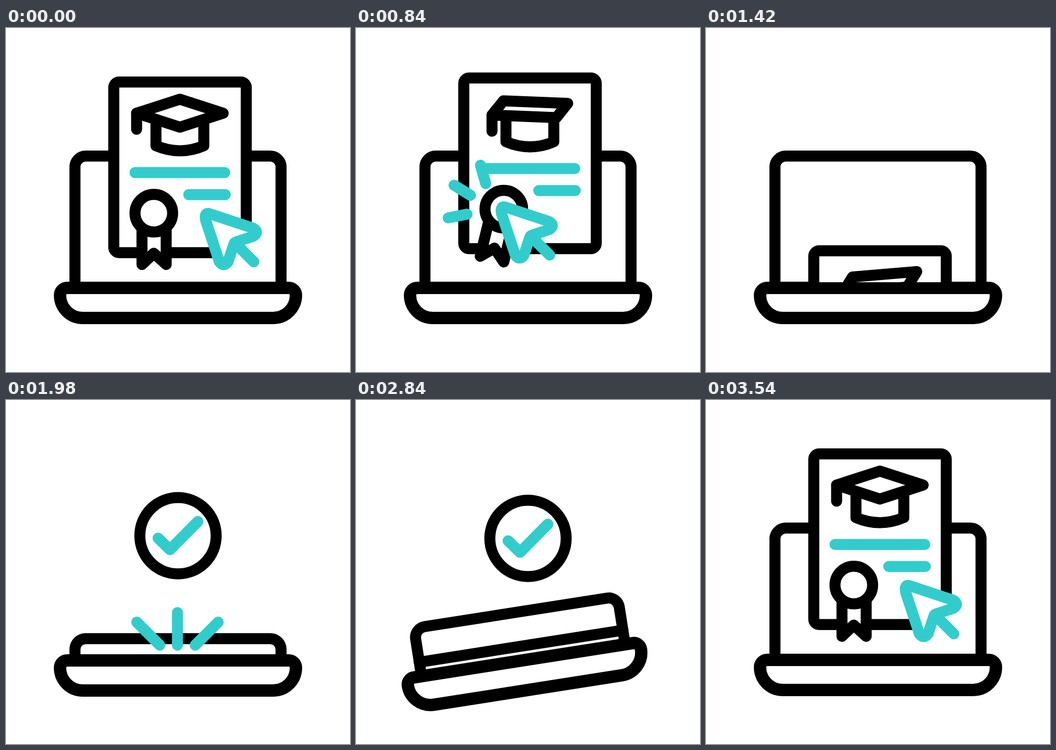
An HTML page that plays this animation: 640x640 px, repeating every 3.6 s.

```html
<!DOCTYPE html>
<html lang="en">
<head>
<meta charset="utf-8">
<title>Online certificate</title>
<style>
  html, body { margin: 0; width: 100%; height: 100%; overflow: hidden; background: #fff; }
  svg { display: block; width: 100vw; height: 100vh; }
  .ink, .teal { stroke-width: 20.5; stroke-linecap: round; stroke-linejoin: round; }
  .ink { fill: #fff; stroke: #000; }
  .teal { fill: none; stroke: #3cc; }
  .solid { fill: #fff; }
</style>
</head>
<body>
<svg viewBox="0 0 640 640">
  <clipPath id="above"><path d="M0 0H640V473H0z"/></clipPath>

  <g id="laptop">
    <path id="screen" class="ink"/>
    <path id="bar" class="ink" d="M128.300 0H511.700"/>
    <path class="ink" style="stroke-width:23" d="M114 483.500H526a13.500 13.500 0 0 1 13.500 13.500a42.500 42.500 0 0 1-42.500 42.500H143a42.500 42.500 0 0 1-42.500-42.500a13.500 13.500 0 0 1 13.500-13.500z"/>
  </g>

  <g clip-path="url(#above)">
    <g id="badge">
      <circle class="ink" cx="320" cy="250.500" r="71"/>
      <path class="teal" d="M283 255L305 276.500L357 224"/>
    </g>
    <g id="page">
      <rect id="sheet" class="ink" stroke-linecap="butt" style="stroke-linecap:butt" x="200.500" y="100.500" width="246.500" height="317.500" rx="10"/>
      <path class="ink" d="M279 175V219Q324 238 368 219V175"/>
      <path id="board" class="ink"/>
      <path id="tassel" class="ink"/>
      <path class="teal" d="M240 269H407M340 310H408"/>
      <path id="ribbon" class="ink" d="M253 375V440L275 419L298 440V375"/>
      <circle class="ink" cx="275" cy="344.500" r="35"/>
    </g>
    <path id="clickRays" class="teal"/>
    <g id="cursor">
      <path class="teal" d="M432 406L461 435"/>
      <path class="teal solid" d="M380 346L460 372.500Q472 380 460 387.500L428 398Q425 399 424 402L413 435Q405 446 397 435L371.500 358Q368 342 380 346z"/>
    </g>
  </g>
  <path id="popRays" class="teal"/>
</svg>
<script>
const LOOP = 3600, BEAT = 200;
const { PI, sin, cos, min, floor } = Math;
const set = (id, name, value) => document.getElementById(id).setAttribute(name, value);
const shift = (id, x, y) => set(id, 'transform', `translate(${x} ${y})`);
const mix = (a, b, p) => a + (b - a) * p;

// Smooth step from 0 to 1 between two times
function ease(t, start, end) {
  const p = Math.max(0, min(1, (t - start) / (end - start)));
  return p * p * (3 - 2 * p);
}
// Smooth rise to 1 and fall back to 0
const hold = (t, start, full, leave, end) => ease(t, start, full) - ease(t, leave, end);

// Three rays that shoot out for one beat and fade from the inside in the next
function drawRays(id, t, start, ray) {
  const from = ease(t, start + BEAT, start + 2 * BEAT);
  const to = ease(t, start, start + BEAT);
  const line = k => {
    const { x, y, angle, inner, outer } = ray(k);
    const at = p => {
      const r = mix(inner, outer, p);
      return `${x + r * cos(angle)} ${y + r * sin(angle)}`;
    };
    return `M${at(from)}L${at(to)}`;
  };
  set(id, 'd', to > from ? [-1, 0, 1].map(line).join('') : '');
}
const clickRay = k => ({ x: 255, y: 337, angle: (-148.5 - 42.5 * k) * PI / 180, inner: 45, outer: 85 });
const popRay = k => ({ x: 319 + 33 * k, y: 456, angle: (k - 2) * PI / 4, inner: 0, outer: 62 });

// The board is a square turning on a flat ellipse, then leaning over
function drawCap(t) {
  const turn = hold(t, 600, 800, 1700, 1720);
  const lean = -7 * hold(t, 1000, 1400, 1700, 1720) * PI / 180;
  const corners = [0, 1, 2, 3].map(k => {
    const a = PI + k * PI / 2 - turn * 35 * PI / 180;
    const x = mix(80.5, 86, turn) * cos(a), y = mix(26, 19, turn) * sin(a);
    return [323.5 + x * cos(lean) - y * sin(lean), 158.5 + x * sin(lean) + y * cos(lean)];
  });
  set('board', 'd', `M${corners.join('L')}z`);
  set('tassel', 'd', `M${corners[0]}v30`);
}

function drawLaptop(t) {
  const tilt = 10 * (ease(t, 2000, 2200) - 2 * ease(t, 2200, 2800) + ease(t, 2800, 3000));
  const sink = hold(t, 1600, 1700, 2000, 2200);
  set('laptop', 'transform', `translate(0 ${sink}) rotate(${tilt} 320 540)`);

  const top = mix(238.3, 443, hold(t, 1600, 1900, 2740, 3055));
  set('screen', 'd', `M128.3 483V${top + 20}a20 20 0 0 1 20-20H491.700a20 20 0 0 1 20 20V483`);
  const barY = mix(444, 498, ease(t, 2740, 3055));
  shift('bar', 0, barY);
  set('bar', 'visibility', t > 2740 && barY < 484 ? 'visible' : 'hidden');
}

function drawPage(t) {
  const hop = ease(t, 800, 1000) - ease(t, 3320, 3550);
  shift('page', 0, 486 * hold(t, 1000, 1600, 2860, 3320) - 68 * hop);

  // The border closes once the cursor has left its corner
  const grow = 53 * hold(t, 0, 400, 3320, 3540);
  set('sheet', 'stroke-dasharray', `${494 + grow} ${106 - 2 * grow} 1000`);

  const swing = 17 * hold(t, 600, 800, 3260, 3540) * cos((t - (t < 1800 ? 800 : 3260)) / BEAT * PI);
  set('ribbon', 'transform', `rotate(${swing} 275 344.5)`);
  drawCap(t);
}

function drawCursor(t) {
  const stops = [[0, 0], [-104, -17], [10, 140], [0, 0]]; // rest, click, hidden, rest
  const stage = ease(t, 0, 400) + ease(t, 800, 1200) + ease(t, 2960, 3540);
  const i = min(2, floor(stage));
  const recoil = 12 * hold(t, 400, 600, 600, 800);
  const [x, y] = stops[i].map((v, axis) => mix(v, stops[i + 1][axis], stage - i) + recoil);
  shift('cursor', x, y);
}

function draw(t) {
  drawLaptop(t);
  shift('badge', 0, 310 * (1 - hold(t, 1600, 2000, 2800, 3260)));
  drawPage(t);
  drawCursor(t);
  drawRays('clickRays', t, 600, clickRay);
  drawRays('popRays', t, 1800, popRay);
}

function tick() {
  draw(performance.now() % LOOP);
  requestAnimationFrame(tick);
}
tick();
</script>
</body>
</html>
```
